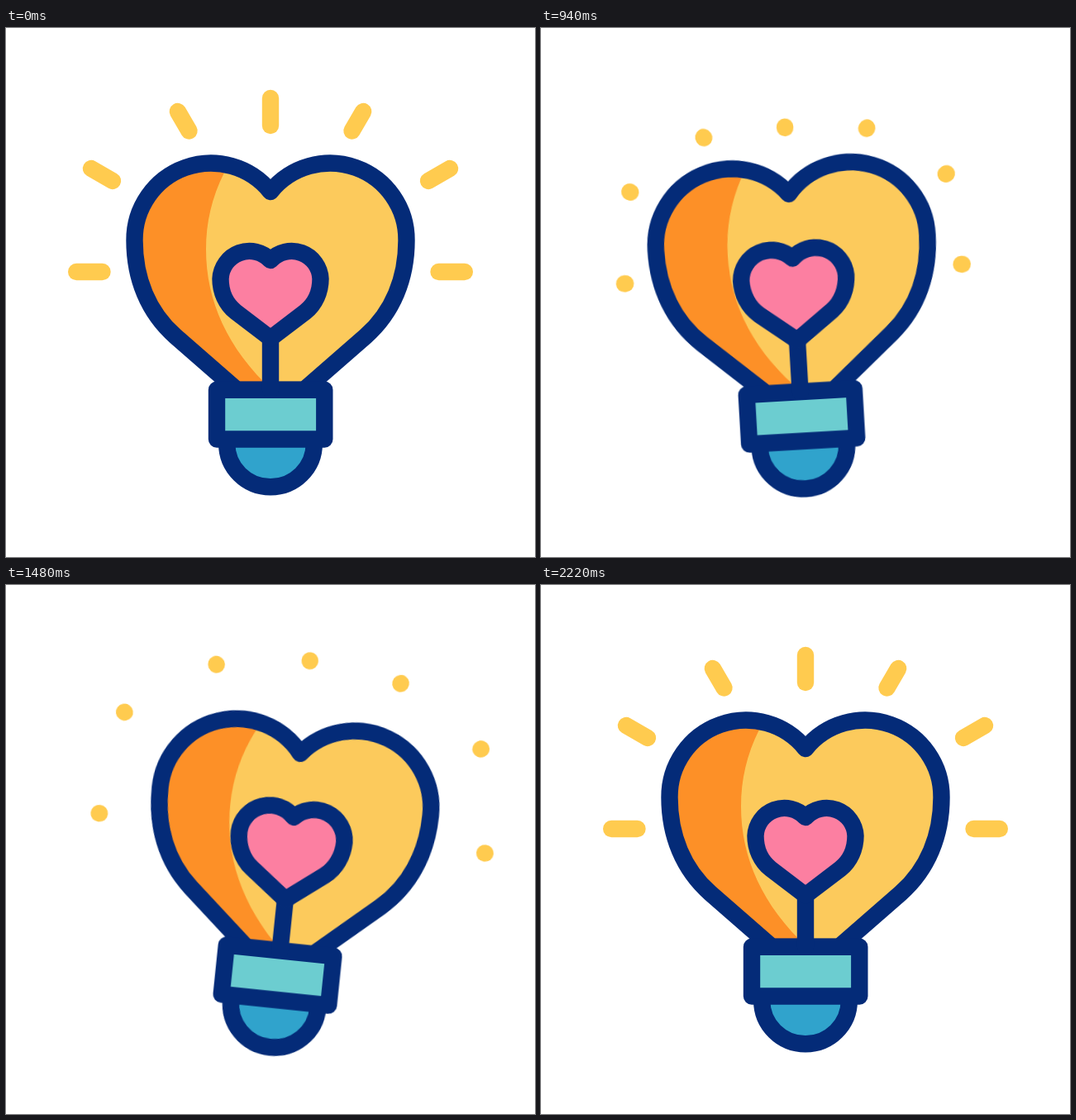
An HTML page without scripts that plays this animation: 640 by 640 pixels, repeating every 2.4 s.

```html
<!DOCTYPE html>
<html lang="en">
<head>
<meta charset="utf-8">
<title>Heart bulb</title>
<style>
  html, body { margin: 0; width: 100%; height: 100%; overflow: hidden; background: #fff; }
  svg { display: block; width: 100%; height: 100%; }

  .line { stroke: #042b78; stroke-width: 20.4; stroke-linecap: round; stroke-linejoin: round; }
  .rays { stroke: #ffcb4f; stroke-width: 20.4; stroke-linecap: round; stroke-dasharray: 1 3; }

  .bob, .tilt, .beat, .rays {
    animation: 2.4s cubic-bezier(.333, 0, .667, 1) 5ms infinite;
  }
  .bob { animation-name: bob; }
  .tilt { animation-name: tilt; transform-origin: 320px 549px; }
  .beat { animation-name: beat; transform-origin: 320px 375.5px; vector-effect: non-scaling-stroke; }
  .rays { animation-name: shine; }

  @keyframes bob {
    0%, 8.333%, 91.667%, 100% { transform: translateY(0); }
    29.167%, 70.833% { transform: translateY(26px); }
    50% { transform: translateY(-26px); }
  }
  @keyframes tilt {
    0%, 8.333%, 91.667%, 100% { transform: rotate(0deg); }
    32.8% { transform: rotate(-5.2deg); }
    57.9% { transform: rotate(7.2deg); }
    75% { transform: rotate(-4.1deg); }
  }
  @keyframes beat {
    0%, 8.333%, 91.667%, 100% { transform: scale(1); }
    28.333% { transform: scale(.87); }
    50% { transform: scale(1.24); }
    70.833% { transform: scale(.925); }
  }
  /* rays leave at the outer end, then grow again from the inner end */
  @keyframes shine {
    0%, 8.333%, 50%, 91.667%, 100% { stroke-dashoffset: 0; visibility: visible; }
    20.833%, 62.5% { stroke-dashoffset: -1; visibility: visible; }
    20.84%, 62.51% { stroke-dashoffset: -1; visibility: hidden; }
    37.49%, 79.16% { stroke-dashoffset: 1; visibility: hidden; }
    37.5%, 79.167% { stroke-dashoffset: 1; visibility: visible; }
  }
</style>
</head>
<body>
<svg viewBox="0 0 640 640" fill="none">
  <defs>
    <path id="heart" d="M279.5 438 L205 373 C172 344 155.5 303 155.5 257 A92.5 92.5 0 0 1 320 198
      A92.5 92.5 0 0 1 484.5 257 C484.5 303 468 344 435 373 L360.5 438 Z"/>
    <clipPath id="inside"><use href="#heart"/></clipPath>
  </defs>

  <g class="bob">
    <g class="tilt">
      <g class="rays">
        <path pathLength="1" d="M116.5 295 H85.2"/>
        <path pathLength="1" d="M129 185 L103 170"/>
        <path pathLength="1" d="M221.5 124.5 L207.8 101"/>
        <path pathLength="1" d="M320 118 V85"/>
        <path pathLength="1" d="M418.5 124.5 L432.2 101"/>
        <path pathLength="1" d="M511 185 L537 170"/>
        <path pathLength="1" d="M523.5 295 H554.8"/>
      </g>

      <use href="#heart" fill="#fcca5c"/>
      <path clip-path="url(#inside)" fill="#fd9027"
        d="M140 150 H276 L264 175 C249 205 242 235 242 268 C242 330 268 388 322 438 H140 Z"/>
      <use href="#heart" class="line"/>

      <path class="line" fill="#30a3cc" d="M267.2 497.5 V503 A52.8 52.3 0 0 0 372.8 503 V497.5"/>
      <path class="line" fill="#6ccdd0" d="M255 437.7 H385.3 V497.5 H255 Z"/>

      <path class="line" d="M320 375.5 V437.7"/>
      <path class="line beat" fill="#fc7fa1" d="M320 375.5 L278 343.5 C266 334 259.5 319 259.5 303.5
        A35 35 0 0 1 320 281 A35 35 0 0 1 380.5 303.5 C380.5 319 374 334 362 343.5 Z"/>
    </g>
  </g>
</svg>
</body>
</html>
```
